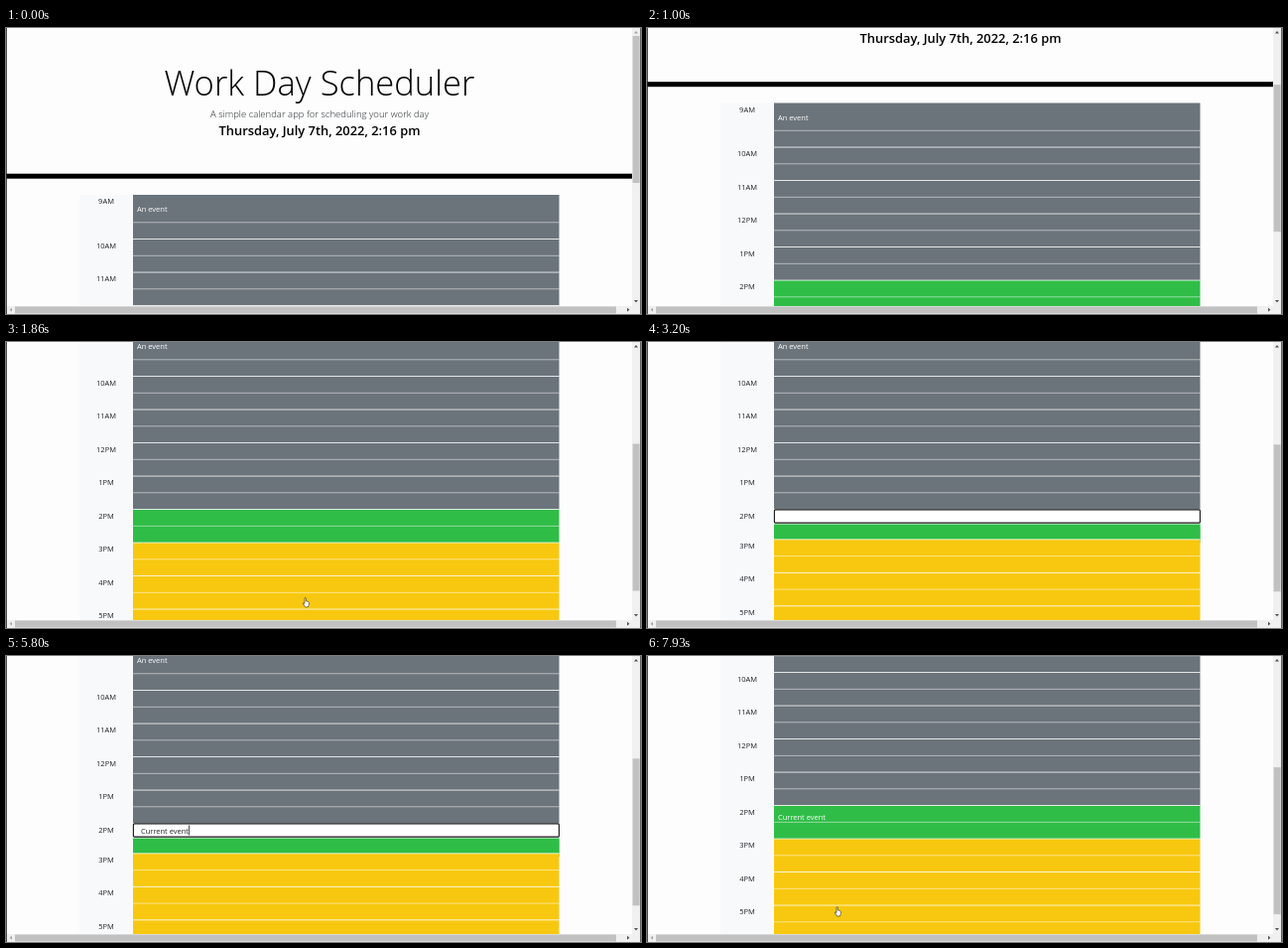
An HTML page that plays this animation: 640 px wide and 288 px high, repeating every 8000 ms.

```html
<!DOCTYPE html>
<html lang="en">
<head>
<meta charset="utf-8">
<title>Work Day Scheduler</title>
<style>
  html, body { margin: 0; width: 100%; height: 100%; overflow: hidden; background: #fdfdfd; }
  svg { display: block; width: 640px; height: 288px; font-family: "Open Sans", "Noto Sans", sans-serif; font-size: 7.5px; }
  .label { fill: #212529; text-anchor: middle; }
  .event { fill: #fff; }
  .center { text-anchor: middle; }
</style>
</head>
<body>
<svg id="stage" viewBox="0 0 640 288" xmlns="http://www.w3.org/2000/svg"></svg>
<script>
const LOOP = 8000;
const STEP = 200 / 3;
const ROW = { left: 128, width: 429.5, hour: 33.5, half: 16.75 };
const COLORS = { past: '#6b747b', present: '#2fbd47', future: '#f7c80f' };
const HOURS = ['9AM', '10AM', '11AM', '12PM', '1PM', '2PM', '3PM', '4PM', '5PM'];
const NOW = 5;
const FIRST_TOP = 168, SECOND_TOP = 212.5;
const EDIT_SHIFT = -3.2;
const EDIT = { from: 2660, to: 7050 };

// Time, scroll offset
const SCROLL = [
  [133, 0], [267, 22], [400, 46], [600, 81], [733, 87], [867, 89],
  [933, 89], [1067, 96], [1200, 110], [1400, 131.5], [1533, 160], [1667, 178],
  [7733, 178], [7933, 196]
];
// Time, pointer x, pointer y
const ENTER = [[1800, 300, 276], [2100, 300, 190], [2300, 260, 112], [2600, 250, 172]];
const LEAVE = [[6467, 230, 188], [6667, 140, 190], [6867, 62, 176], [7000, 42.5, 167],
  [7330, 42.5, 167], [7467, 80, 190], [7600, 145, 235], [7733, 190, 252]];
const TYPED = 'Current event';
const KEY_TIMES = [4200, 4330, 4460, 4600, 4730, 4800, 4930, 5060, 5330, 5460, 5530, 5660, 5800];

const stage = document.getElementById('stage');

function add(parent, tag, attrs, text) {
  const el = document.createElementNS(stage.namespaceURI, tag);
  for (const name in attrs) el.setAttribute(name, attrs[name]);
  if (text) el.textContent = text;
  parent.append(el);
  return el;
}
const rect = (parent, x, y, width, height, fill) => add(parent, 'rect', { x, y, width, height, fill });
const move = (el, x, y) => el.setAttribute('transform', `translate(${x} ${y})`);
const show = (el, on) => el.setAttribute('visibility', on ? 'visible' : 'hidden');

function track(keys, t) {
  if (t <= keys[0][0]) return keys[0].slice(1);
  for (let i = 1; i < keys.length; i++) {
    const a = keys[i - 1], b = keys[i];
    if (t <= b[0]) {
      const p = (t - a[0]) / (b[0] - a[0]);
      return a.slice(1).map((v, n) => v + (b[n + 1] - v) * p);
    }
  }
  return keys[keys.length - 1].slice(1);
}

rect(stage, 0, 0, 640, 288, '#fdfdfd');
const page = add(stage, 'g', {});

// Header
add(page, 'text', { x: 316, y: 68, class: 'center', 'font-size': 34.6, 'font-weight': 300 }, 'Work Day Scheduler');
add(page, 'text', { x: 316, y: 90.3, class: 'center', 'font-size': 9.52, 'font-weight': 300, fill: '#212529' },
  'A simple calendar app for scheduling your work day');
add(page, 'text', { x: 316, y: 107.7, class: 'center', 'font-size': 12.9, 'font-weight': 600 },
  'Thursday, July 7th, 2022, 2:16 pm');
rect(page, 0, 146.7, 631, 5, '#000');

// Time blocks
rect(page, 74, FIRST_TOP, 54, 330, '#f8f9fa');
const later = add(page, 'g', {});
let nowRow, nowText;

HOURS.forEach((hour, i) => {
  const top = i ? SECOND_TOP + (i - 1) * ROW.hour : FIRST_TOP;
  const bottom = SECOND_TOP + i * ROW.hour;
  const color = i < NOW ? COLORS.past : i === NOW ? COLORS.present : COLORS.future;
  const group = add(i > NOW ? later : page, 'g', {});
  const line = (y, opacity) =>
    rect(group, ROW.left, y - 0.4, ROW.width, 0.9, '#fff').setAttribute('opacity', opacity);
  rect(group, ROW.left, top, ROW.width, bottom - top, color);
  if (i) line(top, 0.85);
  line(bottom - ROW.half, 0.55);
  add(group, 'text', { x: 101, y: top + 9.2, class: 'label' }, hour);
  if (i === 0) add(group, 'text', { x: 132, y: 185.3, class: 'event' }, 'An event');
  if (i === NOW) {
    nowRow = top;
    nowText = add(group, 'text', { x: 132, y: top + 14, class: 'event' }, TYPED);
  }
});

// Inline editor
const editor = add(page, 'g', {});
rect(editor, ROW.left, nowRow, ROW.width, 16.5, '#fdfdfd');
add(editor, 'rect', { x: 128.4, y: nowRow + 0.4, width: 429, height: 13.2, rx: 1, fill: '#fff', stroke: '#151515', 'stroke-width': 1.1 });
rect(editor, ROW.left, nowRow + 15, ROW.width, 15.3, COLORS.present);
const input = add(editor, 'text', { x: 136, y: nowRow + 10.4, fill: '#212529' });
const caret = rect(editor, 136, nowRow + 2, 0.7, 10, '#000');
page.append(later);

// Scrollbars
rect(stage, 631, 0, 8.5, 288, '#f0f0f0');
rect(stage, 0, 280, 640, 8, '#f0f0f0');
rect(stage, 9, 280.5, 606, 7, '#c1c1c1');
const thumb = rect(stage, 631.6, 8, 7, 148, '#c1c1c1');
const arrow = (d, fill) => add(stage, 'path', { d, fill });
const upArrow = arrow('M633 5.5h4l-2-2.4z', '#505050');
arrow('M633 274h4l-2 2.4z', '#505050');
arrow('M6 281.8v4l-2.4-2z', '#a3a3a3');
arrow('M626 281.8v4l2.4-2z', '#505050');
rect(stage, 0, 0, 0.8, 288, '#222');
rect(stage, 639.3, 0, 0.7, 288, '#222');

// Pointers
const pointerLook = { fill: '#fff', 'stroke-width': 0.6, 'stroke-linejoin': 'round' };
const pointer = add(stage, 'path', { ...pointerLook, stroke: '#333', d: 'M0 0v7.3l1.7-1.5 1.1 2.5 1-.4-1-2.4h2.3z' });
const hand = add(stage, 'path', { ...pointerLook, stroke: '#222',
  d: 'M1 1q.7-1 1.3 0v3q2.9.2 3 1.4v2q-.2 1.3-.9 2.6H1.5Q.2 8-.7 6.2q.3-1 1.7.3z' });

function drawPointer(t) {
  const entering = t >= 1790 && t < EDIT.from;
  const leaving = t >= 6460;
  const [x, y] = track(entering ? ENTER : LEAVE, t);
  const overRow = x >= ROW.left;
  show(hand, (entering || leaving) && overRow);
  show(pointer, leaving && !overRow);
  move(hand, x, y);
  move(pointer, x, y);
}

function drawEditor(t, editing) {
  const count = KEY_TIMES.filter(k => k <= t).length;
  const text = TYPED.slice(0, count);
  if (input.textContent !== text) input.textContent = text;
  // A trailing space has no reliable drawn width
  const space = text.endsWith(' ') ? 1.95 : 0;
  const width = count ? input.getComputedTextLength() : 0;
  const trimmed = space ? input.getSubStringLength(0, Math.min(count - 1, input.getNumberOfChars())) : width;
  caret.setAttribute('x', 136 + trimmed + space);
  const blinkOff = (t >= 3200 && t < 3800) || t >= 6330;
  show(editor, editing);
  show(caret, editing && !blinkOff);
}

function draw(time) {
  const ms = time % LOOP;
  let frame = Math.floor(ms / STEP) + 1;
  if (Math.floor(frame * STEP / 10 + 1e-6) * 10 > ms) frame--;
  const t = frame * STEP + 0.01;

  const editing = t >= EDIT.from && t < EDIT.to;
  const [scroll] = track(SCROLL, t);
  move(page, 0, -scroll);
  move(later, 0, editing ? EDIT_SHIFT : 0);
  show(nowText, t >= EDIT.to);
  thumb.setAttribute('y', 8 + scroll * 0.531 + (editing ? 0.8 : 0));
  upArrow.setAttribute('fill', scroll > 0 ? '#505050' : '#a3a3a3');
  drawEditor(t, editing);
  drawPointer(t);
}

const start = performance.now();
function tick() {
  draw(performance.now() - start);
  requestAnimationFrame(tick);
}
tick();
</script>
</body>
</html>
```
